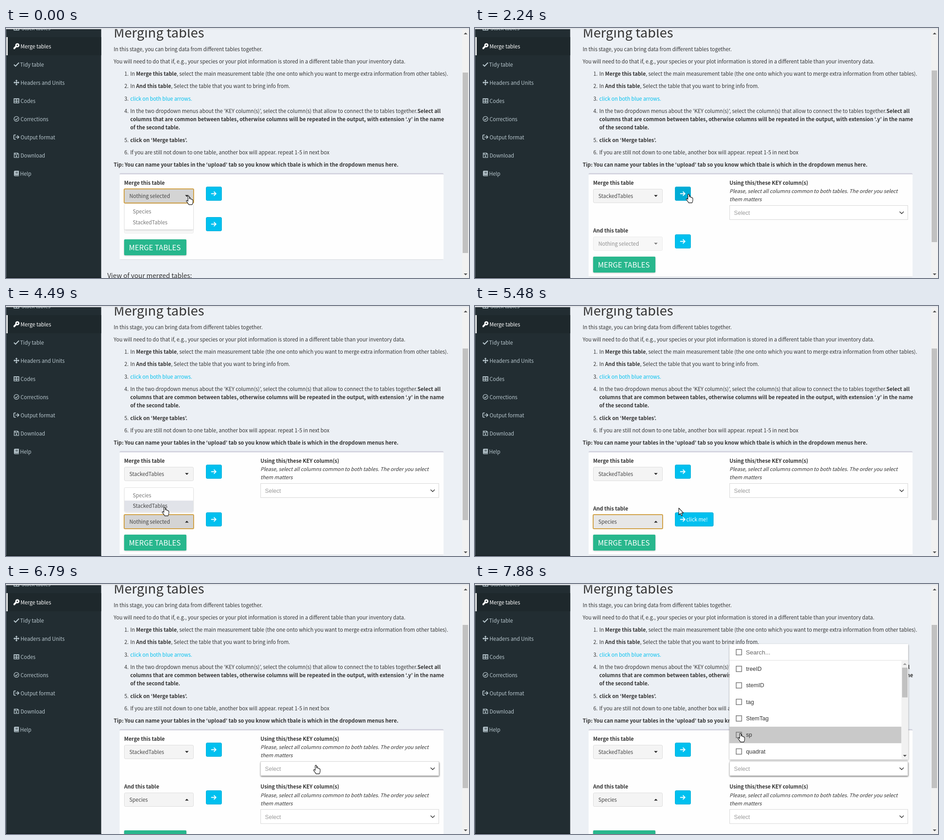
Animation, 1019 px wide and 550 px high, one loop 8 s. Source, as an HTML page:

```html
<!DOCTYPE html>
<html lang="en">
<head>
<meta charset="utf-8">
<style>
html, body { margin: 0; width: 100%; height: 100%; overflow: hidden; background: #ecf0f5; }
svg { display: block; width: 1019px; height: 550px; }
text { font: 11.38px "Noto Sans CJK KR", "Noto Sans CJK SC", "Noto Sans CJK JP", "Open Sans", sans-serif; font-feature-settings: "pwid"; fill: #333; white-space: pre; }
.b { font-weight: 700; }
.i { font-style: italic; font-size: 11.27px; }
.h1 { font-size: 29.2px; }
.h3 { font-size: 14.5px; }
.cta { font-size: 16.1px; fill: #fff; }
.arial { font: 12.6px "Liberation Sans", Arial, sans-serif; }
.search { font-size: 13.5px; fill: #666; }
</style>
</head>
<body>
<svg id="stage" viewBox="0 0 1019 550"></svg>
<script>
const LOOP = 8000;
const stage = document.getElementById('stage');

const text = (x, y, s, cls = '', fill = '', extra = '') =>
  `<text x="${x}" y="${y}" class="${cls}" ${fill && `style="fill:${fill}"`} ${extra}>${s}</text>`;
const rect = (x, y, w, h, fill, extra = '') =>
  `<rect x="${x}" y="${y}" width="${w}" height="${h}" fill="${fill}" ${extra}/>`;
const path = (d, extra = '') => `<path d="${d}" ${extra}/>`;
const group = (x, y, body, extra = '') => `<g transform="translate(${x} ${y})" ${extra}>${body}</g>`;
const bold = s => `<tspan class="b">${s}</tspan>`;
const line = (d, color, width) => path(d, `fill="none" stroke="${color}" stroke-width="${width}"`);
const shadow = (x, y, w, h, alpha) => rect(x, y, w, h, `rgba(0,0,0,${alpha})`, 'rx="3" filter="url(#soft)"');

// Icons are centred on their origin.
const icons = {
  key: c => `<circle cx="2" cy="-2" r="3.1" fill="none" stroke="${c}" stroke-width="3"/>` +
    path('M-1.5-1.5L-6.5 3.5V6.5H-3V4.5H-1V2.5H.5L2.5 .5Z', `fill="${c}"`),
  check: c => line('M-5.5 .5L-2 4L5.5-3.8', c, 2.2),
  move: c => line('M-5 0H5M0-5V5', c, 1.8) +
    path('M0-6.5L2.7-3.6H-2.7ZM0 6.5L2.7 3.6H-2.7ZM-6.5 0L-3.6-2.7V2.7ZM6.5 0L3.6-2.7V2.7Z', `fill="${c}"`),
  table: c => line('M-5.4-4.5H5.4V4.7H-5.4ZM-5.4-3.8H5.4M-5.4 .9H5.4M0-4V4.7', c, 1.6),
  round: c => `<circle r="5.4" fill="none" stroke="${c}" stroke-width="1.3"/>` + line('M-2.8 .2L-.8 2.2L3-1.8', c, 1.5),
  exit: c => line('M-1.5-4.6H-4.5Q-5.7-4.6-5.7-3.4V3.4Q-5.7 4.6-4.5 4.6H-1.5M-2.6 0H4.6M1.8-3.6L5.4 0L1.8 3.6', c, 1.7),
  disk: c => line('M-4.9-4.9H2.6L4.9-2.6V4.9H-4.9ZM-2.8-4.9V-1.6H2V-4.9', c, 1.4) + `<circle cy="1.9" r="1.6" fill="${c}"/>`,
  book: c => path('M-3.5-6H5.4V6H-3.5Q-5.4 6-5.4 4V-4Q-5.4-6-3.5-6Z', `fill="${c}"`) +
    line('M-2.2-3H3.2M-2.2-.8H3.2M-3.8 4H5', '#222d32', 1.1),
};
const caret = (x, y, dir, color = '#222') => path(`M${x - 4} ${y - 2 * dir}h8l-4 ${4 * dir}z`, `fill="${color}"`);

function sidebar() {
  const items = [['key', 'Merge tables'], ['check', 'Tidy table'], ['move', 'Headers and Units'], ['table', 'Codes'],
    ['round', 'Corrections'], ['exit', 'Output format'], ['disk', 'Download'], ['book', 'Help']];
  let out = rect(0, 0, 209.5, 550, '#222d32') + rect(0, 20, 209.5, 40, '#1e282c');
  out += text(34, 5, 'Stack tables', '', '#b8c7ce') + group(23, 0, icons.table('#b8c7ce'));
  items.forEach(([icon, label], k) => {
    const y = 40 + 40 * k, color = k ? '#b8c7ce' : '#fff';
    out += group(23, y, icons[icon](color)) + text(icon === 'check' || icon === 'book' ? 31 : 32, y + 5, label, '', color);
  });
  return out + rect(0, 0, 1, 550, '#59646a') + rect(1, 20, 2.7, 40, '#fff') + rect(0, 548.5, 209.5, 1.5, '#151c20');
}

function instructions() {
  const steps = [
    [105, `In ${bold('Merge this table')}, select the main measurement table (the one onto which you want to merge extra information from other tables).`],
    [132, `In ${bold('And this table')}, Select the table that you want to bring info from.`],
    [160, 'click on both blue arrows.', '#00c0ef'],
    [187, `In the two dropdown menus about the ‘KEY column(s)’, select the column(s) that allow to connect the to tables together.${bold('Select all')}`],
    [251, bold('click on ‘Merge tables’.')],
    [278, 'If you are still not down to one table, another box will appear. repeat 1-5 in next box'],
  ];
  return text(237, 21.3, 'Merging tables', 'h1') +
    text(237, 51, 'In this stage, you can bring data from different tables together.') +
    text(237, 78, 'You will need to do that if, e.g., your species or your plot information is stored in a different table than your inventory data.') +
    steps.map(([y, s, color], k) => text(270, y, `${k + 1}.`, '', '', 'text-anchor="end"') + text(273.5, y, s, '', color)).join('') +
    text(273.5, 205, 'columns that are common between tables, otherwise columns will be repeated in the output, with extension ‘.y’ in the name', 'b') +
    text(273.5, 223, 'of the second table.', 'b') +
    text(237, 305, 'Tip: You can name your tables in the ‘upload’ tab so you know which tbale is which in the dropdown menus here.', 'b');
}

function scrollbar(top, bottom) {
  return rect(1004, 3, 15, 547, '#f1f1f1') + rect(1005, top, 12, bottom - top, '#c1c1c1') +
    caret(1011.5, 12, -1, '#505050') + caret(1011.5, 542, 1, '#505050');
}

function picker(y, label, { bg = '#f4f4f4', ring, dim, up }) {
  const frame = ring
    ? rect(260, y, 153, 31, bg, 'rx="2" stroke="#d0a044" stroke-width="2"')
    : rect(260.5, y + .5, 152, 30, bg, 'rx="2.5" stroke="#ddd"');
  return `<g opacity="${dim ? .6 : 1}">` + frame +
    text(271.5, y + 20, label, '', '#444') + caret(398, y + 15.5, up ? -1 : 1) + '</g>';
}

function menu(top, height, firstRow, hover) {
  let out = shadow(261, top + 2, 151, height, .15) + rect(260.5, top + .5, 152, height, '#fff', 'stroke="#e2e2e2" rx="2"');
  ['Species', 'StackedTables'].forEach((label, k) => {
    const y = firstRow + 23.6 * k;
    if (hover === k) out += rect(261, y, 151, 23.6, '#e1e3e9');
    out += text(279, y + 16.2, label, '', hover === k ? '#444' : '#777');
  });
  return out;
}

function blueButton(y, wide, color = '#00c0ef') {
  return rect(440.5, y + .5, wide ? 84 : 34, 30, color, 'rx="2.5" stroke="#00acd6"') +
    line(`M451.5 ${y + 15.5}H462M457.5 ${y + 10.8}L462.2 ${y + 15.5}L457.5 ${y + 20.2}`, '#fff', 1.8) +
    (wide ? text(465, y + 20, 'click me!', '', '#fff') : '');
}

function keyColumns(y, raised) {
  return text(560, y + 4.5, 'Using this/these KEY column(s)', 'b') +
    text(560, y + 23, 'Please, select all columns common to both tables. The order you select', 'i') +
    text(560, y + 41, 'them matters', 'i') +
    (raised ? shadow(560, y + 52, 394, 32, .45) : '') +
    rect(560.5, y + 50.5, 392, 31, '#fff', 'stroke="#d6d6d6"') +
    text(570, y + 71, 'Select', 'arial', '#999') +
    line(`M934.5 ${y + 64}l4.5 4.5l4.5-4.5`, '#333', 1.5);
}

function columnList(hover) {
  const box = y => rect(574.8, y - 6, 12, 12, 'none', 'stroke="#777" stroke-width="1.5"');
  let out = shadow(560, 133, 394, 255, .4) + rect(560, 132, 393.5, 254.5, '#fff') +
    box(150) + text(596, 154.5, 'Search...', 'arial search') + rect(560, 167.5, 393.5, 1, '#ddd');
  ['treeID', 'stemID', 'tag', 'StemTag', 'sp', 'quadrat'].forEach((name, k) => {
    const y = 186.7 + 36.35 * k;
    if (hover === k) out += rect(560, y - 18.2, 378.5, 36.35, '#c9c9c9');
    out += box(y) + text(596.5, y + 4.3, name, 'arial');
  });
  return out + rect(938.5, 168.5, 15, 218, '#f1f1f1') + rect(940, 184, 12, 65.5, '#c1c1c1') +
    caret(946, 176, -1, '#999') + caret(946, 378, 1, '#505050');
}

// Pointer stops: time, x, y of the tip, shape.
const stops = [
  [0, 402, 369, 'hand'], [150, 396, 385, 'hand'], [300, 384, 401, 'hand'], [420, 368, 415, 'hand'], [540, 351, 427, 'hand'],
  [820, 352, 428, 'arrow'], [940, 360, 427, 'arrow'], [1060, 369, 423, 'arrow'], [1210, 379, 402, 'arrow'], [1330, 382, 395, 'arrow'],
  [1480, 405, 386, 'arrow'], [1600, 446, 372, 'hand'], [1720, 470, 365, 'hand'],
  [2630, 500, 368, 'arrow'], [2750, 550, 373, 'arrow'], [2870, 600, 379, 'arrow'], [3000, 630, 383, 'arrow'],
  [3150, 540, 402, 'arrow'], [3270, 446, 416, 'arrow'], [3420, 405, 447, 'arrow'], [3540, 370, 468, 'arrow'],
  [3690, 352, 475, 'hand'], [3930, 345, 475, 'hand'], [4490, 349, 442, 'hand'], [4640, 341, 420, 'hand'], [4790, 339, 426, 'hand'],
  [5090, 339, 426, 'arrow'], [5240, 365, 430, 'arrow'], [5360, 410, 438, 'arrow'], [5480, 448, 444, 'arrow'], [5630, 459, 461, 'arrow'],
  [5780, 464, 474, 'hand'], [6300, 520, 458, 'arrow'], [6420, 580, 435, 'arrow'], [6540, 640, 412, 'hand'], [6790, 682, 398, 'hand'],
  [7520, 655, 385, 'hand'], [7640, 624, 364, 'hand'], [7760, 600, 342, 'hand'], [7880, 584, 328, 'hand'],
];
const pointers = {
  arrow: 'M.5 .5V15.5L4 12.3L6.3 17.6L8.5 16.6L6.3 11.4H10.8Z',
  hand: 'M-1.5 1.8Q0-.6 1.5 1.8V7Q3 0 4.2 7.4Q6 6.4 7 8.4Q8.8 8 9.4 10V14Q9.2 17 7.6 19.6H.2Q-1.5 16-4.8 12.6Q-5.8 10.2-3.4 10.2L-1.5 12Z',
};

function draw(t) {
  const during = (a, b) => t >= a && t < b;
  const [, px, py, shape] = stops.filter(s => s[0] <= t).pop();
  const first = t >= 2120, second = t >= 6050;
  const shift = first ? 38 : 0;
  const row = 421 + shift;
  const green = second ? 542 : 465 + shift;
  const boxBottom = second ? 560 : first ? 547 : 509;
  const menuDown = t < 820, menuUp = during(3810, 5090);

  let out = '<defs><filter id="soft" x="-10%" y="-50%" width="120%" height="200%"><feGaussianBlur stdDeviation="1.5"/></filter></defs>' +
    rect(0, 0, 1019, 550, '#ecf0f5') + sidebar() + instructions() +
    (second ? scrollbar(90, 449) : first ? scrollbar(93.5, 471) : scrollbar(98, 495));

  out += rect(250, 321, 713, boxBottom - 320, '#d5d8dc', 'rx="2.5"') + rect(250, 319.3, 713, boxBottom - 319.3, '#d2d2de', 'rx="2.5"') +
    rect(250, 322, 713, boxBottom - 322, '#fefefe', 'rx="1"');
  if (!first) out += text(223, 550, 'View of your merged tables:', 'h3');

  out += text(260, 344.5, 'Merge this table', 'b') +
    picker(354, menuDown ? 'Nothing selected' : 'StackedTables',
      { bg: menuDown ? '#d4d4d4' : first ? '#f4f4f4' : '#e7e7e7', ring: !first }) +
    blueButton(349, during(820, 2120), during(1720, 2630) ? '#00acd6' : during(2630, 3690) ? '#31b0d5' : undefined);

  const opened = t >= 3690, chosen = t >= 5090;
  const hovered = during(820, 1210) || during(3540, 3690);
  out += text(260, 412 + shift, 'And this table', 'b') +
    picker(row, chosen ? 'Species' : 'Nothing selected', {
      bg: opened && !chosen ? '#d4d4d4' : hovered || (chosen && !second) ? '#e7e7e7' : '#f4f4f4',
      ring: opened && !second && !during(4940, 5090), dim: !opened, up: t >= 3810 }) +
    blueButton(row - 5, during(5090, 6050), during(5780, 6300) ? '#00acd6' : during(6300, 6790) ? '#31b0d5' : undefined);

  out += shadow(260, green + 1, 137, 35, .25) + rect(260, green, 137, 35, '#28b78d', 'rx="2"') +
    text(270.5, green + 24, 'MERGE TABLES', 'cta');

  if (menuDown) out += menu(386, 57, 392, t < 300 ? -1 : t < 540 ? 0 : 1);
  if (menuUp) out += menu(399, 53, 404.5, t < 4490 ? -1 : t < 4640 ? 1 : 0);
  if (first) out += keyColumns(340, t >= 6790);
  if (second) out += keyColumns(445.5, false);
  if (t >= 6940) out += group(0, t < 7090 ? 7 : 0, columnList(t < 7640 ? -1 : t < 7760 ? 5 : 4), `opacity="${t < 7090 ? .5 : 1}"`);

  out += rect(0, 0, 1019, 2.5, '#e3e6ea');
  return out + group(px, py, path(pointers[shape], 'fill="#fff" stroke="#111" stroke-width="1.1" stroke-linejoin="round"'));
}

let shown = '';
function frame(now) {
  const next = draw(now % LOOP);
  if (next !== shown) stage.innerHTML = shown = next;
  requestAnimationFrame(frame);
}
requestAnimationFrame(frame);
</script>
</body>
</html>
```
